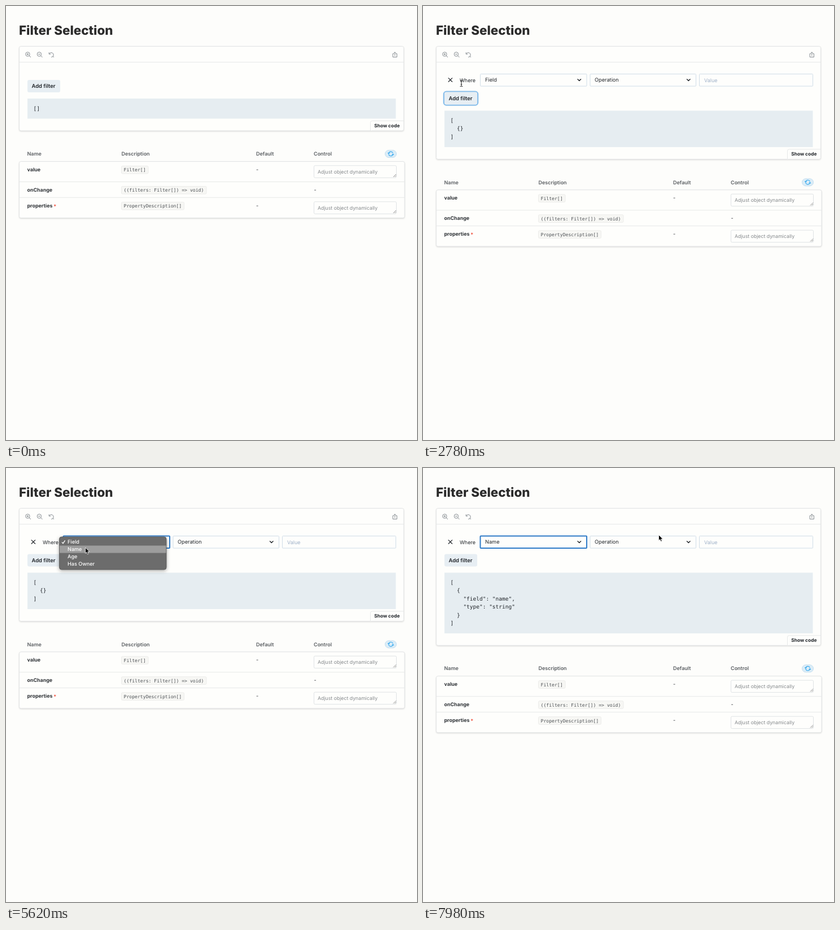
Recreate the animation shown at these times as an HTML page. Size 728x769 px, loop 8 s.

```html
<!DOCTYPE html>
<html lang="en">
<head>
<meta charset="utf-8">
<title>Filter Selection</title>
<style>
  html, body { margin: 0; width: 100%; height: 100%; overflow: hidden; background: #fdfdfb; }
  svg { display: block; width: 728px; height: 769px; font: 9.2px Inter, sans-serif; text-rendering: geometricPrecision; }
  text { fill: #22262b; white-space: pre; }
  .title { font-size: 22.4px; font-weight: 800; fill: #2b2b2b; }
  .card { fill: #fefefc; stroke: #e2e4e5; filter: drop-shadow(0 1px 1px #0002); }
  .line { stroke: #e6e8e8; fill: none; }
  .icon { fill: none; stroke: #858b90; }
  .head text { font-size: 9px; font-weight: 600; fill: #5a5e62; }
  .name { font-size: 8.9px; font-weight: 700; fill: #303438; }
  .chip { fill: #f7f7f4; stroke: #ececea; }
  .sig { font: 8.15px "DejaVu Sans Mono", monospace; fill: #4c5054; }
  .area { fill: #fefefc; stroke: #dfe3e5; }
  .hint { font-size: 8.75px; fill: #85898c; }
  .field { fill: #fefefc; stroke: #d0dde8; }
  .strong { font-size: 9.4px; font-weight: 600; }
  .small { font-size: 8.4px; font-weight: 700; }
  .chevron { fill: none; stroke: #22262b; stroke-width: 1.4; stroke-linecap: round; stroke-linejoin: round; }
  #json text { font: 9.5px "DejaVu Sans Mono", monospace; }
  #menu text { font-weight: 500; font-size: 9.1px; fill: #fff; }
</style>
</head>
<body>
<svg viewBox="0 0 728 769">
  <text class="title" x="23" y="50.5">Filter Selection</text>

  <rect id="card" class="card" x="23.5" y="71.5" width="681" rx="3"/>
  <path class="line" d="M24 99.5H704"/>
  <g class="icon">
    <circle cx="38.4" cy="85.4" r="3.7"/><path d="M41 88l3 3M36.5 85.4h3.8M38.4 83.5v3.8"/>
    <circle cx="58.9" cy="85.4" r="3.7"/><path d="M61.5 88l3 3M57 85.4h3.8"/>
    <path d="M76.2 82.2v3h3M76.6 84.8a4 4 0 1 1 3.6 5.8M83 89l1.8 2"/>
    <path d="M687 84.5h-1.8v6h7.2v-6h-1.8M688.8 88.5v-6.5M686.8 83.6l2-2 2 2"/>
  </g>

  <g id="row">
    <path d="M44.8 127.3l7.2 7.2m0-7.2l-7.2 7.2" stroke="#22262b" stroke-width="1.2"/>
    <text x="65" y="134.5" font-size="9">Where</text>
    <rect id="field" class="field" x="101.5" y="120.5" width="188.5" height="21.5" rx="1"/>
    <text id="fieldText" x="110" y="134.3"></text>
    <path class="chevron" d="M274 129.8l2.8 2.8 2.8-2.8"/>
    <rect class="field" x="296" y="120.5" width="187.5" height="21.5" rx="1"/>
    <text x="304" y="134.3">Operation</text>
    <path class="chevron" d="M467.5 129.8l2.8 2.8 2.8-2.8"/>
    <rect class="field" x="489.5" y="120.5" width="201" height="21.5" rx="1"/>
    <text x="498" y="134.5" font-size="9" style="fill:#9eb0c8">Value</text>
  </g>

  <g id="add">
    <rect id="ring" x="36.8" y="130" width="60.4" height="24" rx="4.5" fill="none" stroke="#86bdea" stroke-width="2.2"/>
    <rect id="addFill" x="38" y="131" width="58" height="22" rx="3"/>
    <text class="strong" x="45.6" y="145.3">Add filter</text>
  </g>

  <rect id="panel" x="38" width="652.5" fill="#e6edf1"/>
  <g id="json"></g>

  <g id="below">
    <path class="line" d="M645.5 221v-14.5q0-3 3-3H704" style="fill:#fefefc"/>
    <text class="small" x="652.3" y="214.8">Show code</text>
    <g class="head">
      <text x="37.5" y="265.2">Name</text>
      <text x="204.5" y="265.2">Description</text>
      <text x="443" y="265.2">Default</text>
      <text x="545" y="265.2">Control</text>
    </g>
    <rect x="671.5" y="255.5" width="20" height="13" rx="6.5" fill="#dcedf7" stroke="#c5dff0"/>
    <path d="M677.8 261.2a4 4 0 0 1 7.6-.6m0 2.6a4 4 0 0 1-7.6-.6M676.3 260l1.4 1.8 1.8-1.4M686.9 264l-1.4-1.8-1.8 1.4" fill="none" stroke="#35a8ee" stroke-width="1.1"/>
    <rect class="card" x="23.5" y="275.5" width="682.5" height="100" rx="3"/>
    <path class="line" d="M24 311.5H706M24 339.3H706"/>
    <g id="props"></g>
    <text x="84.3" y="357.5" class="name" style="fill:#f0503c">*</text>
  </g>

  <g id="menu">
    <rect x="94.5" y="122" width="189.5" height="58" rx="4" fill="#6c6c6c" stroke="#555" stroke-width=".8" style="filter:drop-shadow(0 2px 3px #0005)"/>
    <rect id="hover" x="95" width="188.5" height="13" fill="#9d9d9d"/>
    <path d="M99 131.3l2 2.4 3.6-5.4" fill="none" stroke="#fff" stroke-width="1.3"/>
    <text x="109" y="134.3">Field</text>
    <text x="109" y="147.3">Name</text>
    <text x="109" y="160.3">Age</text>
    <text x="109" y="173.3">Has Owner</text>
  </g>

  <g id="cursor">
    <path id="arrow" d="M0 0v10.2l2.3-2.1 1.6 3.7 1.9-.8-1.6-3.6h3.2z" fill="#000" stroke="#fff" stroke-width=".8"/>
    <path id="hand" d="M-1.2 6.5V.6q0-1 1-1t1 1v3.6q1-.7 1.8.2 1.1-.6 1.7.4 1.4-.4 1.6 1v2.4q0 1.4-1 2.6v1.8H-.4q-.6-1.9-2-3.4l-1.7-2.4q.5-1.4 1.6-.6z" fill="#fff" stroke="#111" stroke-width=".9"/>
    <path id="beam" d="M-2.4-5q1.8 0 2.4.8.6-.8 2.4-.8M0-4.2v9M-2.4 5.6q1.8 0 2.4-.8.6.8 2.4.8M-1.2 1.8h2.4" fill="none" stroke="#111" stroke-width=".9"/>
  </g>
</svg>

<script>
const LOOP = 8000;
const ADDED = 1900, MENU_OPEN = 4600, FADE_START = 7000, FADE_END = 7240, CHOSEN = 7180;
const $ = id => document.getElementById(id);
const set = (id, attrs) => { for (const k in attrs) $(id).setAttribute(k, attrs[k]); };
const show = (id, on) => { $(id).style.display = on ? '' : 'none'; };

const layouts = [
  { shift: 0, panelY: 164, panelH: 35.5, json: ['[]'] },
  { shift: 50.4, panelY: 185.5, panelH: 64.5, json: ['[', '  {}', ']'] },
  { shift: 93.3, panelY: 185.5, panelH: 107.5,
    json: ['[', '  {', '    "field": "name",', '    "type": "string"', '  }', ']'] },
];

// Pointer keys: time, x, y
const path = [
  [250, -10, 205], [780, 68, 137], [3000, 68, 137], [3550, 138, 129],
  [5100, 138, 129], [5450, 140.5, 141], [6830, 140.5, 141],
  [7120, 331, 142], [7420, 405, 127], [7800, 417.5, 118.5], [LOOP, 417.5, 118.5],
];

function pointerAt(t) {
  if (t <= path[0][0]) return path[0].slice(1);
  const i = path.findIndex(k => k[0] >= t);
  const [t0, x0, y0] = path[i - 1], [t1, x1, y1] = path[i];
  const p = (t - t0) / (t1 - t0), e = p * p * (3 - 2 * p);
  return [x0 + (x1 - x0) * e, y0 + (y1 - y0) * e];
}

function propRow(y, name, signature, width, editable) {
  const control = editable
    ? `<rect class="area" x="545.5" y="${y - 7.2}" width="146" height="21.5" rx="2"/>
       <text class="hint" x="552" y="${y + 7}">Adjust object dynamically</text>
       <path d="M686 ${y + 13}l5-5m-2.4 5l2.4-2.4" stroke="#777" stroke-width=".8"/>
       <text x="443" y="${y + 3}">-</text>`
    : `<text x="545.5" y="${y + 3}">-</text>`;
  return `<text class="name" x="37.5" y="${y + 3}">${name}</text>
    <rect class="chip" x="204.5" y="${y - 6.5}" width="${width}" height="13.5" rx="2"/>
    <text class="sig" x="208.5" y="${y + 3.4}">${signature}</text>${control}`;
}
$('props').innerHTML =
  propRow(290, 'value', 'Filter[]', 47.5, true) +
  propRow(326, 'onChange', '((filters: Filter[]) =&gt; void)', 150.5, false) +
  propRow(354, 'properties', 'PropertyDescription[]', 111, true);

let current = -1;
function applyLayout(index) {
  if (index === current) return;
  current = index;
  const { shift, panelY, panelH, json } = layouts[index];
  set('card', { height: 149.5 + shift });
  set('panel', { y: panelY, height: panelH });
  set('below', { transform: `translate(0 ${shift})` });
  set('add', { transform: `translate(0 ${index ? 21.6 : 0})` });
  $('json').innerHTML = json.map((line, i) =>
    `<text x="48.5" y="${panelY + 20.6 + i * 14.35}">${line}</text>`).join('');
  show('row', index > 0);
  $('fieldText').textContent = index === 2 ? 'Name' : 'Field';
}

function draw(t) {
  applyLayout(t < ADDED ? 0 : t < CHOSEN ? 1 : 2);
  const [x, y] = pointerAt(t);
  const added = t >= ADDED, focused = t >= MENU_OPEN;

  const overAdd = !added && x > 38 && x < 96 && y > 131 && y < 153;
  const overLabel = added && x > 64 && x < 94;
  const overField = added && x > 101 && x < 290 && y > 120 && y < 142;
  set('addFill', { fill: overAdd ? '#dce2eb' : '#e7eef3' });
  show('ring', added && !focused);
  $('field').style.stroke = focused ? '#2f7bc8' : overField ? '#aab9d2' : '';
  $('field').style.strokeWidth = focused ? 2 : 1;

  show('menu', focused && t < FADE_END);
  set('menu', { opacity: Math.min(1, Math.max(0, (FADE_END - t) / (FADE_END - FADE_START))) });
  set('hover', { y: y < 137.5 && t < FADE_START ? 124.5 : 137.5 });

  set('cursor', { transform: `translate(${x} ${y})` });
  show('cursor', t > path[0][0]);
  show('hand', overAdd);
  show('beam', overLabel);
  show('arrow', !overAdd && !overLabel);
}

const start = performance.now();
function frame() {
  draw((performance.now() - start) % LOOP);
  requestAnimationFrame(frame);
}
frame();
</script>
</body>
</html>
```
